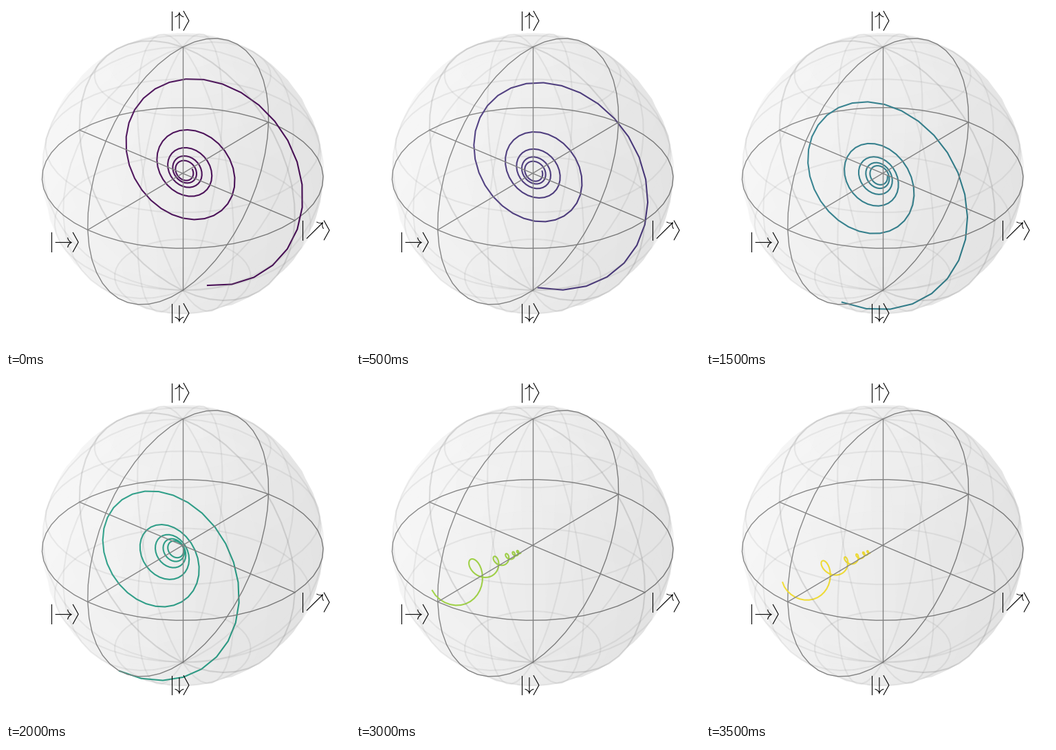
A matplotlib script that plays this animation: 500x500 px, repeating every 4 s.

```python
import numpy as np
import matplotlib.pyplot as plt
from matplotlib.animation import FuncAnimation
from matplotlib.lines import Line2D
from matplotlib.transforms import Affine2D
from mpl_toolkits.mplot3d import Axes3D  # noqa: F401

SIZE = 500
EM = 20 * 100 / 72  # label font size in pixels
TURNS = 5.3
# starting angle of each run, from the lower pole towards the x axis
ANGLES = [-9, -3, 8, 24, 40, 90, 94, 97.5]

fig = plt.figure(figsize=(5, 5), dpi=100, facecolor="white")
ax = fig.add_axes([0, 0, 1, 1], projection="3d")
ax.set_axis_off()
ax.set(xlim=(-0.7, 0.7), ylim=(-0.7, 0.7), zlim=(-0.7, 0.7))
ax.set_box_aspect((1, 1, 1), zoom=0.96)
ax.view_init(elev=30, azim=-50)

# pixel coordinates with the origin at the top left
pixels = Affine2D().scale(1 / SIZE, -1 / SIZE).translate(0, 1) + fig.transFigure


def half_sphere(start, zorder):
    u = np.linspace(start, start + np.pi, 25)
    v = np.linspace(0, np.pi, 25)
    x = np.outer(np.cos(u), np.sin(v))
    y = np.outer(np.sin(u), np.sin(v))
    z = np.outer(np.ones(25), np.cos(v))
    ax.plot_surface(x, y, z, rstride=2, cstride=2, color="lightgray",
                    linewidth=0, alpha=0.08)
    ax.plot_wireframe(x, y, z, rstride=5, cstride=5, color="gray", alpha=0.13)
    for zdir in "zx":
        ax.plot(np.cos(u), np.sin(u), zs=0, zdir=zdir, lw=1, color="gray",
                zorder=zorder)


def draw_axes():
    for axis in np.eye(3):
        ax.plot(*np.outer(axis, [-1, 1]), lw=1, color="gray", zorder=2)


def stroke(x, y):
    fig.add_artist(Line2D(x, y, lw=0.8, color="black", transform=pixels))


def ket(cx, cy, arrow, width):
    """Bar, arrow and angle bracket around a pixel position."""
    left = cx - (width + 0.667) * EM / 2
    top, bottom = cy - EM / 2, cy + EM / 2
    bar = left + 0.139 * EM
    stroke([bar, bar], [top, bottom])
    fig.text((left + (0.2 + width / 2) * EM) / SIZE,
             1 - (cy + 0.25 * EM) / SIZE, f"${arrow}$", fontsize=20,
             math_fontfamily="cm", ha="center", va="baseline")
    x0 = left + (0.255 + width) * EM
    x1 = x0 + 0.278 * EM
    stroke([x0, x1, x0], [top, cy, bottom])


def trajectory(i):
    """Bloch vector turning about a tilted axis while it decays."""
    phi = np.radians(ANGLES[i])
    start = np.array([np.sin(phi), 0.16 * np.exp(-i) - 0.05, -np.cos(phi)])

    tilt = ANGLES[i] / 90
    axis = np.array([1, 0.25 - 0.13 * tilt, 0.1 + 0.07 * tilt])
    axis /= np.linalg.norm(axis)

    along = axis * (start @ axis)
    across = start - along
    side = np.cross(axis, across)

    t = np.linspace(0, TURNS, 161)[:, None]
    turn = 2 * np.pi * t
    drift = 1 / (1 + 0.55 * t ** 1.3)
    shrink = 1 / (1 + 1.35 * t ** 1.4)
    x, y, z = (along * drift
               + shrink * (across * np.cos(turn) + side * np.sin(turn))).T
    return y, -x, z


half_sphere(0, 1.8)
half_sphere(-np.pi, 2)
draw_axes()

ket(253.4, 21.5, r"\uparrow", 0.5)
ket(253.4, 446.5, r"\downarrow", 0.5)
ket(85.7, 343.3, r"\rightarrow", 1)
ket(450.6, 326, r"\nearrow", 1)

path, = ax.plot([], [], [], lw=1.5, zorder=1.9)
colors = plt.get_cmap("viridis")(np.linspace(0, 1, len(ANGLES)))


def update(i):
    path.set_data_3d(*trajectory(i))
    path.set_color(colors[i])
    return [path]


anim = FuncAnimation(fig, update, frames=len(ANGLES), interval=500, repeat=True)
plt.show()
```
